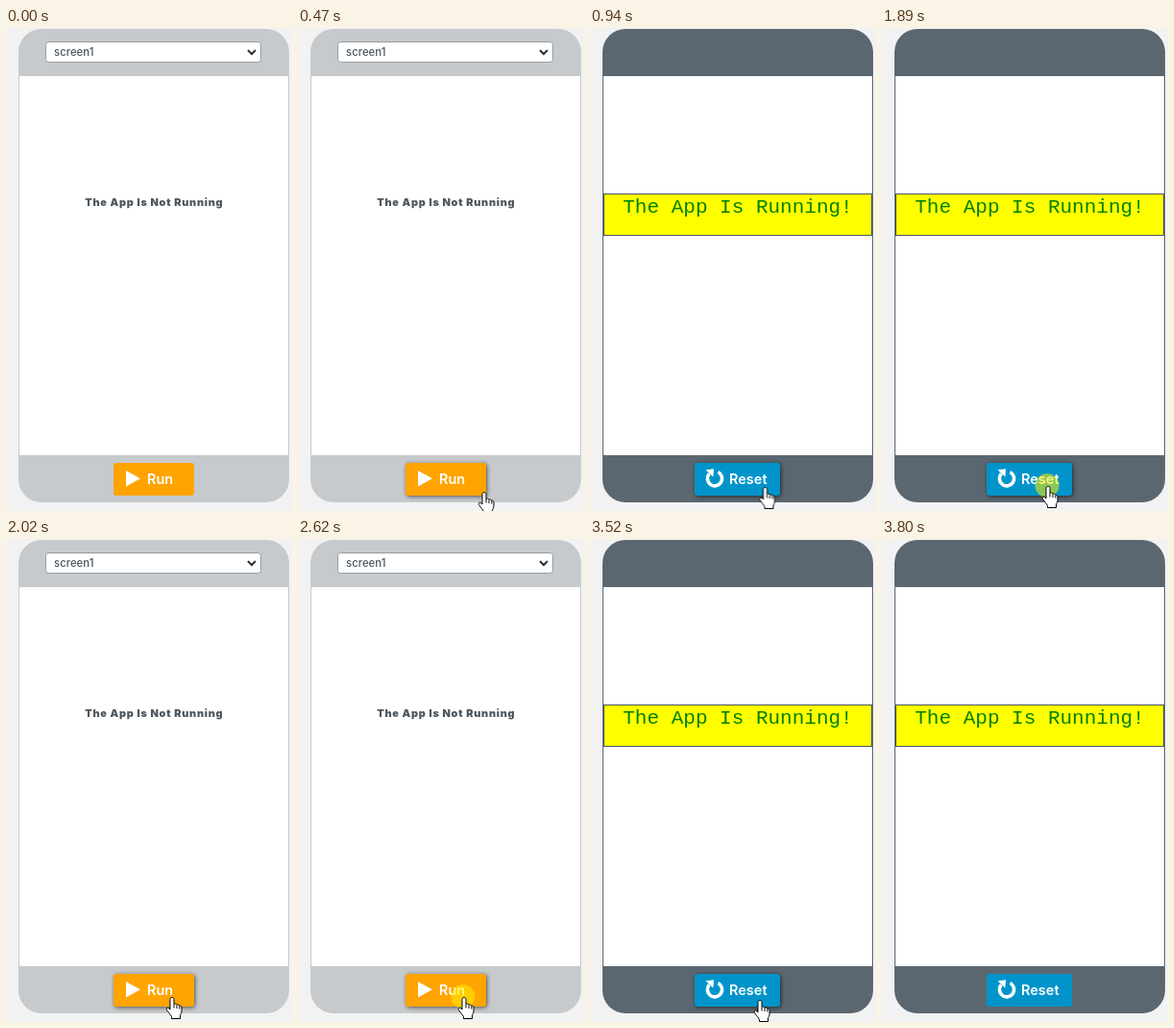
An HTML page that plays this animation: 298 px wide and 502 px high, repeating every 4.73 s.

```html
<!DOCTYPE html>
<html lang="en">
<head>
<meta charset="utf-8">
<title>App preview</title>
<style>
  html, body { margin: 0; width: 100%; height: 100%; overflow: hidden; background: #f2f2f2; }
  svg { display: block; width: 298px; height: 502px; }
  text { font-family: Inter, "Open Sans", sans-serif; }

  .bezel { fill: #c6cacd; }
  .option { font-size: 11.4px; font-weight: 500; fill: #4d575f; }
  .idle { font-size: 11px; font-weight: 900; letter-spacing: .7px; fill: #4d575f; text-anchor: middle; }
  .live { font: 21px "Courier New", "Liberation Mono", monospace; fill: #008000; text-anchor: middle; }
  .label { font-size: 14.5px; font-weight: 600; fill: #fff; }

  .bezel, .off, .on, .stopped, .running, .button, .halo, .cursor, .arrow, .hand {
    animation: 4730ms step-end infinite;
  }
  .bezel { animation-name: bezel; }
  .off { animation-name: off; }
  .on { animation-name: on; }
  .stopped { animation-name: stopped; }
  .running { animation-name: running; }
  .button { animation-name: hover; }
  .halo { animation-name: click; }
  .cursor { animation-name: move; }
  .arrow { animation-name: arrow; }
  .hand { animation-name: hand; }

  /* phone state */
  @keyframes bezel {
    0%, 42.7%, 100% { fill: #c6cacd; }
    19.87%, 59.83% { fill: #5b6770; }
  }
  @keyframes off {
    0%, 42.7% { opacity: 1; }
    19.87%, 59.83%, 100% { opacity: 0; }
  }
  @keyframes on {
    0%, 42.7% { opacity: 0; }
    19.87%, 59.83%, 100% { opacity: 1; }
  }
  @keyframes stopped {
    0%, 42.7% { opacity: 1; }
    19.87%, 61.31%, 100% { opacity: 0; }
  }
  @keyframes running {
    0%, 42.7% { opacity: 0; }
    19.87%, 61.31%, 100% { opacity: 1; }
  }

  /* pointer */
  @keyframes hover {
    0%, 77.37%, 100% { filter: none; }
    9.93% { filter: drop-shadow(1px 1px 2px rgba(0, 0, 0, .6)); }
  }
  @keyframes click {
    0%, 18.6%, 42.7%, 58.35%, 100% { opacity: 0; }
    15.85%, 39.95%, 55.39% { opacity: 1; }
    56.87% { opacity: .6; }
  }
  @keyframes arrow {
    0%, 9.93%, 80.33%, 100% { opacity: 0; }
    4.22%, 77.37% { opacity: 1; }
  }
  @keyframes hand {
    0%, 77.37%, 100% { opacity: 0; }
    9.93% { opacity: 1; }
  }
  @keyframes move {
    0%, 100% { transform: translate(207px, 498px); }
    5.7% { transform: translate(206px, 494px); }
    7.18% { transform: translate(203px, 490px); }
    8.66% { transform: translate(199px, 486px); }
    9.93% { transform: translate(194px, 482px); }
    11.41% { transform: translate(189px, 480px); }
    12.89% { transform: translate(185px, 478px); }
    14.37% { transform: translate(182.5px, 477px); }
    28.32% { transform: translate(177px, 476.5px); }
    29.8% { transform: translate(173px, 476px); }
    74.41% { transform: translate(177px, 479px); }
    75.89% { transform: translate(185px, 484px); }
    77.37% { transform: translate(196px, 489px); }
    78.85% { transform: translate(206px, 496px); }
  }
</style>
</head>
<body>
<svg viewBox="0 0 298 502">
  <rect class="bezel" x="13" y="1" width="282" height="492" rx="24"/>
  <rect x="14" y="50" width="280" height="394" fill="#fff"/>

  <g class="off">
    <rect x="41.5" y="14.5" width="224" height="21" rx="3" fill="#fff" stroke="#949ca2"/>
    <text class="option" x="50" y="29">screen1</text>
    <path d="M252 23l4 4 4-4" fill="none" stroke="#2b3035" stroke-width="2"/>
  </g>

  <text class="idle stopped" x="154.3" y="185">The App Is Not Running</text>
  <g class="running">
    <rect x="14.5" y="172.5" width="279" height="43" fill="#ff0" stroke="#4d575f"/>
    <text class="live" x="154" y="192">The App Is Running!</text>
  </g>

  <g class="off">
    <rect class="button" x="112" y="452" width="84" height="34" rx="3" fill="#ffa400"/>
    <path d="M125 460l15 8.2-15 8.3z" fill="#fff"/>
    <text class="label" x="147" y="474">Run</text>
  </g>
  <g class="on">
    <rect class="button" x="109" y="452" width="89" height="34" rx="3" fill="#0094ca"/>
    <path d="M133.5 461.5A7.6 7.6 0 1 1 124.3 463.2" fill="none" stroke="#fff" stroke-width="3.6"/>
    <path d="M120.5 459.2l8.5-1-.6 8.3z" fill="#fff"/>
    <text class="label" x="145" y="474">Reset</text>
  </g>

  <g class="cursor" stroke="#000" stroke-linejoin="round">
    <circle class="halo" cx="-1" cy="-.5" r="12.5" fill="rgba(255,238,0,.55)" stroke="none"/>
    <path class="arrow" fill="#fff" d="M0 0V16.5L3.8 13 6.3 18.6 8.6 17.6 6.2 12.1H11.5Z"/>
    <g class="hand">
      <g transform="translate(-6.5 0)">
        <path fill="#fff" d="M6.5 .5C7.8 .5 8.5 1.3 8.5 2.5V7.5C9 6.8 11 6.8 11.5 8.3 12.3 7.6 14 8 14.3 9.3 15.3 8.9 16.5 9.6 16.5 11V15C16.5 17 15 18 15 20V22.5H6V20.5C5 18.5 3 16.5 1 13.5 .2 12 1.5 10.6 3 11.4L4.5 13V2.5C4.5 1.3 5.2 .5 6.5 .5Z"/>
        <path fill="none" d="M8.5 7.5V11.5M11.5 8.5V12M14.3 9.5V12.5"/>
      </g>
    </g>
  </g>
</svg>
</body>
</html>
```
